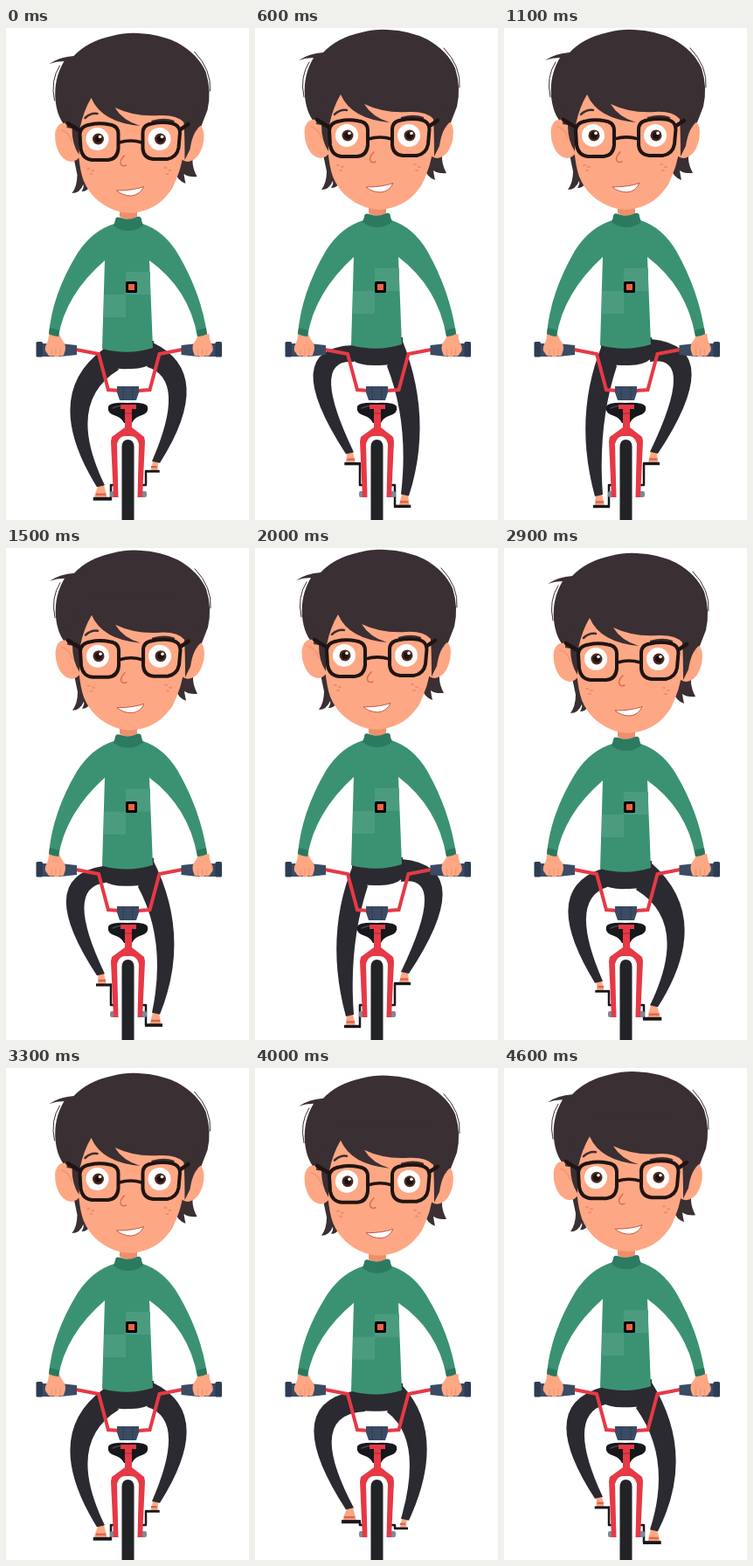
An HTML page for the animation above (4.7 s loop, 278 px wide and 563 px high).

```html
<!DOCTYPE html>
<html lang="en">
<head>
<meta charset="utf-8">
<title>Cyclist</title>
<style>
  html, body { margin: 0; width: 100%; height: 100%; overflow: hidden; background: #fff; }
  svg { display: block; width: 100vw; height: 100vh; }
  .line { fill: none; stroke-linecap: round; stroke-linejoin: round; }
  .hair { fill: #3a2f33; }
  .skin { fill: #fea784; }
  .shade { fill: #ee8f6c; }
  .dark { fill: #2b2a30; }
  .navy { fill: #3a4b63; }
</style>
</head>
<body>
<svg viewBox="0 0 278 563">
  <defs>
    <g id="grip">
      <path d="M80 368L106 373L117 414L130 415" fill="none" stroke="#e63946" stroke-width="4"/>
      <path class="navy" d="M41 361H62L81 363V374L62 376H41z"/>
      <rect x="34.500" y="359" width="7.500" height="17.500" rx="1.500" fill="#2b3c53"/>
      <path d="M62 363V375" stroke="#26364c"/>
      <path class="skin" d="M49 350H61Q63 356 67 361Q69 366 67 371Q66 377 61 375Q58 378 54 375Q49 377 47 372Q43 369 46 362Q49 357 49 350z"/>
      <path class="line" d="M52 368V374M57 367V375M62 367V374" stroke="#e9946f" stroke-width=".9"/>
    </g>
    <g id="ear">
      <path class="skin" d="M84 116Q72 106 62 110Q55 115 57 130Q61 151 75 153Q81 153 86 146z"/>
      <path class="line" d="M64 117Q72 118 76 130" stroke="#f09574" stroke-width="1.500"/>
    </g>
  </defs>

  <g id="legs">
    <path id="pelvis" class="dark"/>
    <g id="leftLeg"></g>
    <g id="rightLeg"></g>
  </g>

  <g id="bike">
    <path d="M117 433Q120 428 139 429Q159 428 162 433Q164 441 153 444Q147 446 144 452H135Q132 446 126 444Q115 441 117 433z" fill="#17181c"/>
    <path class="line" d="M122 435Q130 431 139 433" stroke="#44464d" stroke-width="1.500"/>
    <rect x="119" y="530" width="7" height="7" rx="2" fill="#7d8b98"/>
    <rect x="154" y="530" width="7" height="7" rx="2" fill="#7d8b98"/>
    <path d="M127 537V474L133 466H146L152 474V537z" fill="#fff"/>
    <path d="M132.500 563V479Q133 471 139.500 471Q146 471 146.500 479V563z" fill="#222327"/>
    <path d="M131 431H149V436H144V457L158 468L159 473L156 537H150.500L152 476Q150 468 144 467H135Q129 468 127 476L128.500 537H123L120 473L121 468L136 457V436H131z" fill="#e63946"/>
    <path d="M136 441H144" stroke="#b92c3d" stroke-width="1.500"/>
    <use href="#grip"/>
    <use href="#grip" transform="matrix(-1 0 0 1 281.500 0)"/>
    <path class="navy" d="M127 410H152V417L149 426H130L127 417z"/>
    <path d="M134 410V426M145 410V426" stroke="#2b3c53"/>
  </g>

  <path id="shirt" fill="#3b9272"/>
  <path d="M50 343L61 346L60 353Q55 353 49 350zM229 343L218 346L219 353Q225 353 230 350z" fill="#2c775d"/>
  <g id="torso">
    <rect x="137" y="279" width="28" height="26" fill="#4b9c7f"/>
    <rect x="112" y="305" width="25" height="26" fill="#4b9c7f"/>
    <path class="shade" d="M130 198H150V216Q140 222 130 216z"/>
    <path d="M125 220Q125 215 131 217Q140 221 150 216Q155 215 155 220L157 226Q149 232 140 232Q130 232 123 226z" fill="#2c7a5f"/>
  </g>
  <rect x="138.500" y="291.500" width="10" height="10" fill="#f4623f" stroke="#000" stroke-width="3" stroke-linejoin="round"/>

  <g id="head">
    <path class="hair" d="M50 41Q62 33 78 32Q94 15 122 9Q138 5 152 6Q177 7 197 17Q220 30 229 50Q236 72 231 94L224 112L217 140Q210 153 219 170Q210 171 204 167Q205 174 206 178Q197 175 194 165Q195 179 187 188L96 181Q94 187 87 187Q90 182 89 179Q85 189 76 189Q82 181 82 168L71 115Q59 104 57 82Q55 58 67 38Q58 38 50 41z"/>
    <path class="line" d="M56 83Q51 60 62 43M216 27Q236 48 234 72" stroke="#3a2f33" stroke-width="1"/>
    <use href="#ear"/>
    <use href="#ear" transform="matrix(-1 0 0 1 283.500 0)"/>
    <path class="skin" d="M83 104Q88 86 97 76H190Q206 92 205 122Q205 151 195 174Q183 203 155 210Q140 214 126 209Q99 199 89 174Q81 151 83 104z"/>
    <path class="hair" d="M70 114Q72 82 96 60L190 60Q220 80 224 111Q214 118 211 139L205 151Q205 123 204 108Q196 99 176 100Q148 102 125 91Q134 106 154 112Q110 108 98 80Q89 95 85 115L84 145Q76 133 76 115z"/>
    <path class="line" d="M91 103Q97 97 105 98M168 107Q182 103 192 107" stroke="#3a2f33" stroke-width="2.500"/>
    <g id="eyes"></g>
    <path class="line" d="M71 109L84 117M200 116L209 110" stroke="#1f1512" stroke-width="4.500"/>
    <path class="line" d="M130 131Q143 127 156 131" stroke="#1f1512" stroke-width="3.600"/>
    <path class="line" d="M97 110.500Q107 108 119 110.500Q129 112 129 121V138Q128 150 117 151H99Q88 150 86 138L85 121Q86 112 97 110.500zM167 109.500Q180 107 190 109Q199.500 111 199.500 120L198 137Q196 148 185 150H169Q158 149 157 138V120Q157 111 167 109.500z" stroke="#1f1512" stroke-width="4"/>
    <path class="line" d="M136 146Q130 152 132 156Q134 159 138 157" stroke="#d96f52" stroke-width="1.500"/>
    <path d="M127 186Q146 186 158 181.500Q154 191 144 192Q134 192 127 186z" fill="#fff" stroke="#c35948" stroke-width="1"/>
    <path class="line" d="M94 161h2M99 163h2M97 167h2M182 160h2M187 163h2M184 167h2" stroke="#f18c6e" stroke-width="2"/>
  </g>
</svg>

<script>
const LOOP = 4700, STEP = 100, MID = 140, AXLE = 523;

// [ms, left crank angle in degrees: 0 top, 90 towards the viewer]
const PHASE = [[0, 130], [1100, 540], [2000, 900], [2500, 1210], [3300, 1570], [4000, 1881], [4600, 2125], [4700, 2166]];
// [crank angle, knee distance from the middle, knee height]
const KNEE = [[0, 65, 397], [81, 63, 416], [130, 57, 437], [145, 47, 447], [180, 37, 451],
  [261, 47, 434], [310, 57, 416], [325, 59, 412], [360, 65, 397]];

const $ = id => document.getElementById(id);

function sample(table, x) {
  let i = 1;
  while (i < table.length - 1 && table[i][0] < x) i++;
  const a = table[i - 1], b = table[i];
  const k = (x - a[0]) / (b[0] - a[0]);
  return a.slice(1).map((v, n) => v + (b[n + 1] - v) * k);
}

function eye(x) {
  return `<circle cx="${x}" cy="127" r="13" fill="#fff"/>
    <circle cx="${x + 1}" cy="127" r="6.500" fill="#4f2a20"/>
    <circle cx="${x + 1}" cy="127" r="4" fill="#1c1210"/>
    <circle cx="${x + 3}" cy="124.500" r="1.800" fill="#fff"/>`;
}

// Curve from a to c that passes through b halfway.
function through(a, b, c) {
  const ctrl = [0, 1].map(n => 2 * b[n] - (a[n] + c[n]) / 2);
  return `Q${ctrl} ${c}`;
}

function leg(deg, side, lift) {
  const rad = deg * Math.PI / 180, near = Math.sin(rad);
  const raised = Math.max(0, Math.cos(rad));
  const at = (off, y) => [MID + side * off, y];
  const [knee, kneeY] = sample(KNEE, deg);
  const pedal = AXLE - 24.5 * Math.cos(rad);
  const ankle = pedal - 13.5 - 2.5 * near;
  const hip = at(28, (side < 0 ? 367 : 360) + lift);
  const groin = at(11 + 16 * raised, 391 - 5 * raised + lift);
  const outer = at(36, ankle + 2), inner = at(27, ankle);
  const limb = `M${hip}${through(hip, at(knee + 9.5, kneeY - 4), outer)}L${inner}` +
    through(inner, at(knee - 11, kneeY + 6), groin) + 'z';

  const toe = 36 + 3 * near, sole = pedal - 1;
  const foot = `M${at(34.5, ankle)}L${at(toe, sole - 4)}Q${at(toe + 1, sole)} ${at(toe - 2, sole)}` +
    `L${at(25 - near, sole)}L${at(26 - near, sole - 5)}L${at(28, ankle)}z`;
  const strap = `M${at(26, sole - 4)}L${at(toe - 1, sole - 4)}`;
  const crank = `M${at(15, AXLE)}L${at(20, AXLE)}L${at(20, pedal)}`;
  const plate = `M${at(19, pedal)}L${at(38 + 3 * near, pedal)}`;

  return `<path class="line" d="${crank}" stroke="#17181c" stroke-width="2.500"/>
    <path class="skin" d="${foot}"/>
    <path d="${strap}" stroke="#d9674f" stroke-width="2.500"/>
    <path d="${plate}" stroke="#17181c" stroke-width="${3.4 + 0.7 * near}"/>
    <path class="dark" d="${limb}"/>`;
}

function shirt(d) {
  return `M124 ${224 + d}Q98 ${232 + d} 81 ${259 + d}Q53 ${305 + d / 2} 49 350Q55 353 60 353` +
    `Q68 ${305 + d / 2} 113 ${266 + d}L110 ${367 + d}Q140 ${375 + d} 168 ${366 + d}L164 ${266 + d}` +
    `Q209 ${298 + d / 2} 219 353Q225 353 230 350Q223 ${303 + d / 2} 197 ${259 + d}` +
    `Q181 ${232 + d} 156 ${224 + d}Q140 ${233 + d} 124 ${224 + d}z`;
}

function draw(ms) {
  const deg = sample(PHASE, ms)[0] % 360;
  const rad = deg * Math.PI / 180;
  const lift = -3.5 * Math.cos(2 * rad) - 0.6;
  const sway = -3 * Math.max(0, -Math.cos(rad)) ** 4;

  $('pelvis').setAttribute('d', `M111 ${358 + lift}H169V${382 + lift}Q158 ${391 + lift} 140 ${390 + lift}Q121 ${391 + lift} 111 ${384 + lift}z`);
  $('leftLeg').innerHTML = leg(deg, -1, lift);
  $('rightLeg').innerHTML = leg((deg + 180) % 360, 1, lift);
  $('shirt').setAttribute('d', shirt(lift));
  $('torso').setAttribute('transform', `translate(0 ${lift})`);
  $('head').setAttribute('transform', `translate(${sway} ${lift})`);
}

$('eyes').innerHTML = eye(105) + eye(176);
const start = performance.now();
function tick() {
  const ms = (performance.now() - start) % LOOP;
  draw(Math.floor(ms / STEP) * STEP);
  requestAnimationFrame(tick);
}
tick();
</script>
</body>
</html>
```
